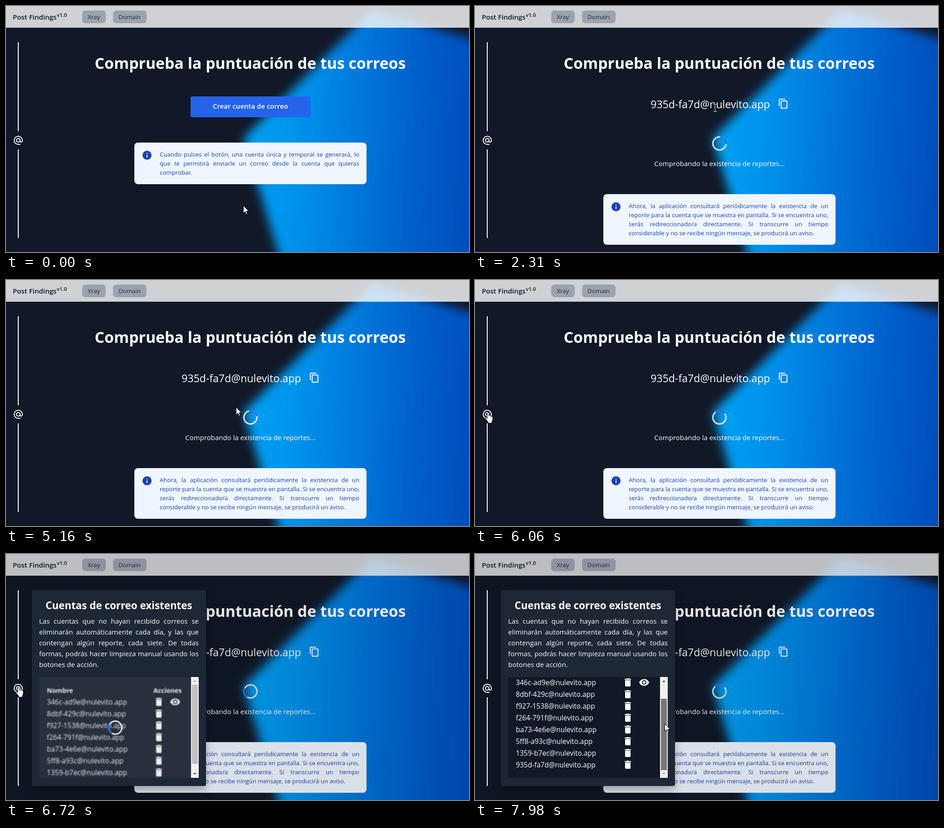
Recreate the animation shown at these times as an HTML page. Size 1021 by 544 pixels, loop 8 s.

```html
<!DOCTYPE html>
<html lang="es">
<head>
<meta charset="utf-8">
<title>Post Findings</title>
<style>
  html, body { margin: 0; width: 100%; height: 100%; overflow: hidden; background: #111827; }
  svg { display: block; }
  text, p { font-family: "Open Sans", "Noto Sans", sans-serif; }
  text { fill: #fff; }
  .mid { text-anchor: middle; }
  .semi { font-weight: 600; }
  .bold { font-weight: 700; }
  p { margin: 0; text-align: justify; text-align-last: justify; white-space: nowrap; }
  p span { display: block; }
  p span:last-child { text-align-last: left; }
  .info { font-size: 13.2px; line-height: 20px; color: #1e40af; }
  .about { font-size: 15px; line-height: 24px; color: #fff; }
  #card { filter: drop-shadow(0 8px 9px rgba(0, 0, 0, .3)); }
</style>
</head>
<body>
<svg id="stage" width="1021" height="544" viewBox="0 0 1021 544">
  <defs>
    <linearGradient id="sea" gradientUnits="userSpaceOnUse" x1="530" y1="300" x2="1021" y2="321">
      <stop offset="0" stop-color="#00a2f5"/>
      <stop offset=".25" stop-color="#0090ea"/>
      <stop offset=".55" stop-color="#0073d8"/>
      <stop offset=".8" stop-color="#005cc8"/>
      <stop offset="1" stop-color="#004ebc"/>
    </linearGradient>
    <filter id="soft" filterUnits="userSpaceOnUse" x="400" y="-100" width="750" height="850">
      <feGaussianBlur stdDeviation="11"/>
    </filter>
    <g id="spinner" fill="none" stroke-width="3">
      <circle r="14.4" stroke="#e5e7eb"/>
      <path class="arc" d="M-10.2-10.2A14.4 14.4 0 0 1 10.2-10.2" stroke="#2563eb"/>
    </g>
    <g id="notice">
      <circle r="10" fill="#1e40af"/>
      <path d="M-1-5h2v2h-2zM-1-1h2v6h-2z" fill="#eff6ff"/>
    </g>
    <path id="bin" fill="#fff" d="M-6 7q0 2 2 2h8q2 0 2-2V-5H-6zM7-8H3.5l-1-1h-5l-1 1H-7v2H7z"/>
    <g id="eye">
      <path fill="#fff" d="M0-7.5C-5-7.5-9.3-4.4-11 0-9.3 4.4-5 7.5 0 7.5S9.3 4.4 11 0C9.3-4.4 5-7.5 0-7.5z"/>
      <circle r="4" fill="none" stroke="#111827" stroke-width="2"/>
    </g>
  </defs>

  <rect width="1021" height="544" fill="#111827"/>
  <path d="M524 292L808 8 1080 88V700H647z" fill="url(#sea)" filter="url(#soft)"/>

  <rect width="1021" height="48" fill="#fff" fill-opacity=".8"/>
  <g fill="#9ca3af">
    <rect x="168" y="10" width="52" height="28" rx="7"/>
    <rect x="236" y="10" width="74" height="28" rx="7"/>
  </g>
  <g class="semi" style="--ink:#111827">
    <text x="15" y="30" font-size="15.1" style="fill:#111827">Post Findings</text>
    <text x="112" y="24" font-size="11.4" style="fill:#111827">v1.0</text>
  </g>
  <g class="mid" font-size="13.3" font-weight="500">
    <text x="194" y="29" style="fill:#1f2937">Xray</text>
    <text x="272.5" y="29" style="fill:#1f2937">Domain</text>
  </g>

  <text class="mid bold" x="538.5" y="139" font-size="33.8">Comprueba la puntuación de tus correos</text>

  <g id="before">
    <rect id="button" x="407" y="200" width="264" height="46" rx="4"/>
    <text class="mid semi" x="539" y="227" font-size="15">Crear cuenta de correo</text>
    <rect x="283" y="302" width="512" height="92" rx="8" fill="#eff6ff"/>
    <use href="#notice" x="311" y="330"/>
    <foreignObject x="339" y="318" width="440" height="70">
      <p class="info"><span>Cuando pulses el botón, una cuenta única y temporal se generará, lo</span><span>que te permitirá enviarle un correo desde la cuenta que quieras</span><span>comprobar.</span></p>
    </foreignObject>
  </g>

  <g id="after">
    <text class="mid" x="519" y="226" font-size="23.1">935d-fa7d@nulevito.app</text>
    <path transform="translate(668 204)" fill="none" stroke="#fff" stroke-width="2" d="M3 17V3q0-1 1-1H16M8 6H19q1 0 1 1V21q0 1-1 1H8q-1 0-1-1V7q0-1 1-1z"/>
    <use href="#spinner" x="539" y="304"/>
    <text class="mid" x="539" y="354" font-size="15">Comprobando la existencia de reportes...</text>
    <rect x="283" y="416" width="512" height="112" rx="8" fill="#eff6ff"/>
    <use href="#notice" x="311" y="444"/>
    <foreignObject x="339" y="432" width="440" height="90">
      <p class="info"><span>Ahora, la aplicación consultará periódicamente la existencia de un</span><span>reporte para la cuenta que se muestra en pantalla. Si se encuentra uno,</span><span>serás redireccionado/a directamente. Si transcurre un tiempo</span><span>considerable y no se recibe ningún mensaje, se producirá un aviso.</span></p>
    </foreignObject>
  </g>

  <rect id="dim" width="1021" height="544" fill-opacity=".09"/>

  <g fill="none" stroke="#fff" stroke-width="2">
    <path d="M27 80V277M27 317V513"/>
    <g transform="translate(15 285)">
      <circle cx="12" cy="12" r="4"/>
      <path d="M17 21H12A9 9 0 1 1 21 12V13.4A2.5 2.5 0 0 1 16 13.4V12"/>
    </g>
  </g>

  <g id="panel">
    <rect id="card" x="57" y="80" width="384" height="433" rx="4" fill="#1e2736"/>
    <text class="mid bold" x="249" y="122" font-size="22.35">Cuentas de correo existentes</text>
    <foreignObject x="73" y="136" width="352" height="130">
      <p class="about"><span>Las cuentas que no hayan recibido correos se</span><span>eliminarán automáticamente cada día, y las que</span><span>contengan algún reporte, cada siete. De todas</span><span>formas, podrás hacer limpieza manual usando los</span><span>botones de acción.</span></p>
    </foreignObject>
    <rect id="well" x="73" y="272" width="352" height="223" rx="4"/>
    <svg x="73" y="272" width="335" height="223" viewBox="73 272 335 223">
      <g id="list">
        <text class="bold" x="90" y="307" font-size="14.2">Nombre</text>
        <text class="bold" x="325" y="307" font-size="14.2">Acciones</text>
        <use href="#eye" x="373" y="327"/>
      </g>
    </svg>
    <rect x="408" y="272" width="17" height="223" fill="#f1f1f1"/>
    <rect id="thumb" x="410" width="13"/>
    <path id="up" d="M413 283h7l-3.5-4z"/>
    <path id="down" d="M413 484h7l-3.5 4z"/>
    <use id="loading" href="#spinner" x="241" y="384"/>
  </g>

  <g id="cursor" stroke-linejoin="round">
    <path id="arrow" fill="#fff" stroke="#000" d="M0 0V16.5L3.9 13 6.5 19 9 18 6.4 12.2H11.7z"/>
    <path id="hand" fill="#fff" stroke="#111" transform="translate(-6 0)" d="M4.4 13V2a1.7 1.7 0 0 1 3.4 0V7.5a1.6 1.6 0 0 1 3 .5 1.6 1.6 0 0 1 3 .8 1.5 1.5 0 0 1 2.7 .8V15q0 3-2 5V23H6.5V20.5L1 13.8a1.7 1.7 0 0 1 2.5-2.2z"/>
    <g id="beam" fill="none">
      <path stroke="#000" stroke-width="3" d="M-4-8H4M0-8V8M-4 8H4"/>
      <path stroke="#fff" d="M-4-8H4M0-8V8M-4 8H4"/>
    </g>
  </g>
</svg>
<script>
const LOOP = 8000;
const CREATED = 2310, HOVERED = 6210, OPENING = 6360, LOADED = 7110, DRAG = 7590;
const ROW = 26, MAX_SCROLL = 43, MAX_DRAG = 31;
const $ = id => document.getElementById(id);
const show = (id, on) => { $(id).style.display = on ? '' : 'none'; };

// The screen refreshes only at these moments.
const ticks = [
  0, 460, 610, 730, 850, 970, 1090, 1240, 1640, 2310, 2430, 2580, 2730, 2880, 3000,
  3150, 3270, 3390, 3540, 3680, 3800, 3930, 4050, 4180, 4330, 4480, 4630, 4750, 4870,
  5010, 5160, 5280, 5400, 5550, 5670, 5820, 5940, 6060, 6210, 6360, 6480, 6600, 6720,
  6870, 6990, 7110, 7230, 7350, 7470, 7590, 7710, 7860, 7980
];

// time, x, y, pointer shape
const moves = [
  [0, 523, 441, 'arrow'], [460, 522, 439, 'arrow'], [970, 529, 240, 'hand'],
  [1090, 530, 226, 'hand'], [1640, 529, 225, 'hand'], [2310, 529, 225, 'beam'],
  [3000, 529, 225, 'beam'], [3150, 515, 234, 'arrow'], [3390, 452, 266, 'arrow'],
  [3540, 336, 285, 'arrow'], [3680, 303, 280, 'arrow'], [4050, 645, 232, 'arrow'],
  [4180, 672, 217, 'hand'], [4330, 675, 210, 'hand'], [4870, 675, 215, 'hand'],
  [5010, 663, 219, 'arrow'], [5160, 507, 281, 'arrow'], [5400, 157, 320, 'arrow'],
  [5670, 55, 304, 'arrow'], [5820, 34, 297, 'hand'], [5940, 28, 293, 'hand'],
  [6210, 27, 293, 'hand'], [6870, 27, 293, 'hand'], [6990, 60, 298, 'arrow'],
  [7350, 400, 345, 'arrow'], [7590, 418, 344, 'arrow'], [7710, 418, 350, 'arrow'],
  [7860, 418, 359, 'arrow'], [7980, 418, 375, 'arrow']
];

const accounts = ['346c-ad9e', '8dbf-429c', 'f927-1538', 'f264-791f',
  'ba73-4e6e', '5ff8-a93c', '1359-b7ec', '935d-fa7d'];

$('list').insertAdjacentHTML('beforeend', accounts.map((name, i) => `
  <text x="90" y="${333 + i * ROW}" font-size="15.4">${name}@nulevito.app</text>
  <use href="#bin" x="337" y="${327 + i * ROW}"/>`).join(''));

function pointerAt(t) {
  const i = moves.findLastIndex(m => m[0] <= t);
  const [t0, x0, y0, shape] = moves[i];
  const [t1, x1, y1] = moves[i + 1] || moves[i];
  const k = t1 > t0 ? (t - t0) / (t1 - t0) : 0;
  return { x: Math.round(x0 + (x1 - x0) * k), y: Math.round(y0 + (y1 - y0) * k), shape };
}

function drawList(t, pointerY) {
  const loaded = t >= LOADED;
  const drag = t >= DRAG ? Math.max(0, pointerY - 344) : 0;
  const list = $('list'), thumb = $('thumb');
  list.setAttribute('transform', `translate(0 ${-drag * MAX_SCROLL / MAX_DRAG})`);
  list.style.filter = loaded ? 'none' : 'blur(.8px)';
  list.style.opacity = loaded ? 1 : .92;
  $('well').setAttribute('fill', loaded ? '#111827' : '#282f3d');
  thumb.setAttribute('y', 289 + drag);
  thumb.setAttribute('height', loaded ? 158 : 175);
  thumb.setAttribute('fill', t > DRAG ? '#787878' : '#c1c1c1');
  $('up').setAttribute('fill', drag ? '#505050' : '#a3a3a3');
  $('down').setAttribute('fill', drag < MAX_DRAG ? '#505050' : '#a3a3a3');
  show('loading', !loaded);
}

function draw(t) {
  const pointer = pointerAt(t);
  show('before', t < CREATED);
  show('after', t >= CREATED);
  show('dim', t >= HOVERED);
  show('panel', t >= OPENING);
  $('button').setAttribute('fill', t >= 970 ? '#1d4ed8' : '#2563eb');
  $('panel').style.opacity = Math.min(1, .35 + (t - OPENING) / 260);
  document.querySelector('.arc').setAttribute('transform', `rotate(${50 + (t - CREATED) / 965 * 360})`);
  drawList(t, pointer.y);
  $('cursor').setAttribute('transform', `translate(${pointer.x + .5} ${pointer.y + .5})`);
  for (const shape of ['arrow', 'hand', 'beam']) show(shape, shape === pointer.shape);
}

const start = performance.now();
let drawn = -1;
function frame() {
  const t = Math.max(0, performance.now() - start) % LOOP;
  const tick = ticks.findLast(v => v <= t);
  if (tick !== drawn) draw(drawn = tick);
  requestAnimationFrame(frame);
}
frame();
</script>
</body>
</html>
```
